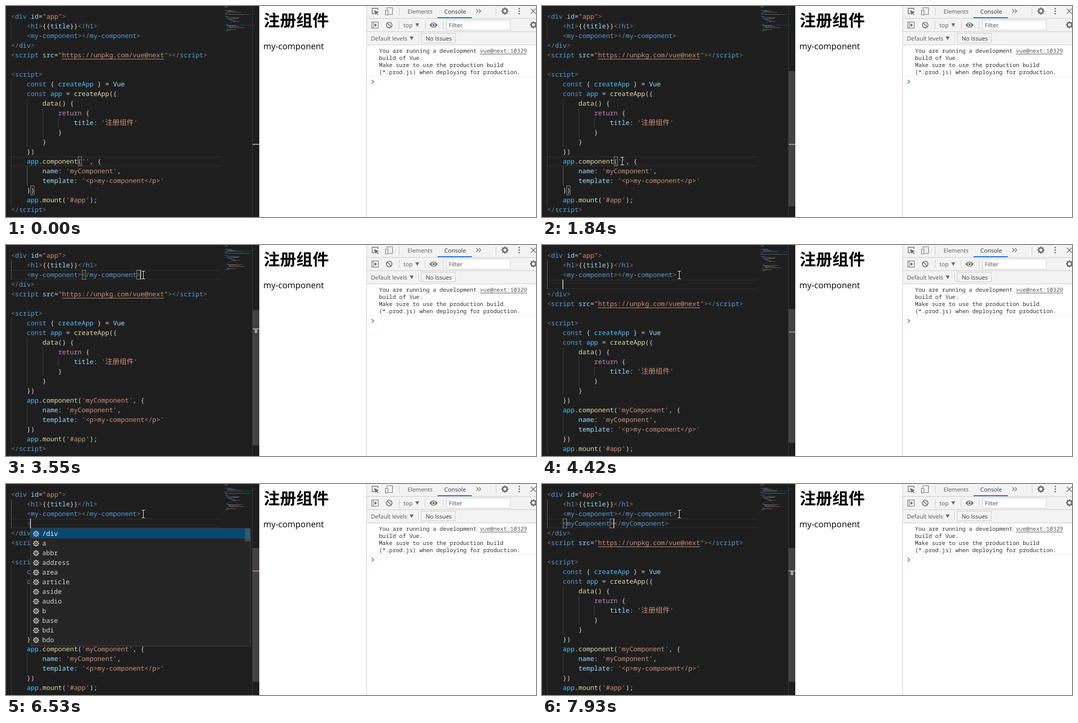
Animation, 1040 px wide and 415 px high, one loop 8 s. Source, as an HTML page with a canvas:

```html
<!DOCTYPE html>
<html lang="zh">
<head>
<meta charset="utf-8">
<title>Component registration</title>
<style>
html, body { margin: 0; width: 1040px; height: 415px; overflow: hidden; background: #fff; }
canvas { display: block; }
</style>
</head>
<body>
<canvas id="stage" width="1040" height="415"></canvas>
<script>
const ctx = document.getElementById('stage').getContext('2d');
const LOOP = 8000;
const X0 = 9.5, Y0 = 11, CW = 7.697, LH = 19;
const MONO = '"Noto Sans Mono", "DejaVu Sans Mono", monospace';
const SANS = '"Open Sans", "Noto Sans", sans-serif';
const CJK = '"Noto Sans CJK SC", "Noto Sans CJK", sans-serif';
const CODE_FONT = '500 12.83px ' + MONO;

// Token colours, keyed by the first letter of each token
const COLORS = {
  p: '#808080', t: '#569cd6', a: '#9cdcfe', s: '#ce9178', d: '#d4d4d4',
  c: '#4fc1ff', f: '#dcdcaa', r: '#c586c0', e: '#8c4545'
};
const parse = line => line ? line.split('~').map(s => [s[0], s.slice(1)]) : [];

const HEAD = [
  'p<~tdiv~a id~d=~s"app"~p>',
  'p    <~th1~p>~d{{~atitle~d}}~p</~th1~p>',
  'p    <~tmy-component~p></~tmy-component~p>'
].map(parse);
const BODY = [
  'p</~tdiv~p>',
  'p<~tscript~a src~d=~s"https://unpkg.com/vue@next"~p></~tscript~p>',
  '',
  'p<~tscript~p>',
  't    const~d { ~ccreateApp~d } = ~aVue',
  't    const~c app~d = ~fcreateApp~d({',
  'f        data~d() {',
  'r            return~d {',
  "a                title:~s '注册组件'",
  'd            }',
  'd        }',
  'd    })',
  "c    app~d.~fcomponent~d(~s''~d, {",
  "a        name:~s 'myComponent'~d,",
  "a        template:~s '<p>my-component</p>'",
  'd    })',
  "c    app~d.~fmount~d(~s'#app'~d);",
  'p</~tscript~p>'
].map(parse);
const NAMED = parse("c    app~d.~fcomponent~d(~s'myComponent'~d, {");
const NEW_LINE = [
  [7930, 'p    <~tmyComponent~p></~tmyComponent~p>'],
  [7850, 'p    <~tmyComponent~p>'],
  [6900, 'p    <~tmyComponent'],
  [5580, 'e    <'],
  [0, '']
];
const TAGS = ['/div', 'a', 'abbr', 'address', 'area', 'article', 'aside', 'audio', 'b', 'base', 'bdi', 'bdo'];
const CARET_ON = [
  [500, 1030], [1330, 1840], [1990, 2560], [3060, 3840], [4350, 4930],
  [5360, 6100], [6460, 7340], [7780, 8000]
];

function box(x, y, w, h, color) {
  ctx.fillStyle = color;
  ctx.fillRect(x, y, w, h);
}
function frame(x, y, w, h, color) {
  ctx.strokeStyle = color;
  ctx.lineWidth = 1;
  ctx.strokeRect(x + .5, y + .5, w - 1, h - 1);
}
function text(str, x, y, font, color) {
  ctx.font = font;
  ctx.fillStyle = color;
  ctx.fillText(str, x, y);
}
function poly(points, color, width, close) {
  ctx.beginPath();
  points.forEach(([x, y]) => ctx.lineTo(x, y));
  if (close) ctx.closePath();
  ctx.strokeStyle = ctx.fillStyle = color;
  ctx.lineWidth = width || 1;
  if (width) ctx.stroke(); else ctx.fill();
}
function ring(x, y, r, color, width) {
  ctx.beginPath();
  ctx.arc(x, y, r, 0, 7);
  ctx.strokeStyle = color;
  ctx.lineWidth = width;
  ctx.stroke();
}
function disc(x, y, r, color) {
  ctx.beginPath();
  ctx.arc(x, y, r, 0, 7);
  ctx.fillStyle = color;
  ctx.fill();
}
function gear(x, y, r, color, width) {
  ring(x, y, r * .6, color, width);
  for (let i = 0; i < 8; i++) {
    const a = i * Math.PI / 4, c = Math.cos(a), s = Math.sin(a);
    poly([[x + c * r * .65, y + s * r * .65], [x + c * r, y + s * r]], color, r * .36);
  }
}

const colX = col => X0 + col * CW;
const rowY = row => Y0 + row * LH;

// Monospace text, one cell at a time; wide glyphs take 14px
function codeText(str, x, y, color) {
  for (const ch of str) {
    const wide = ch.charCodeAt(0) > 255;
    if (ch !== ' ') text(ch, x, y, wide ? '14px ' + CJK : CODE_FONT, color);
    x += wide ? 14 : CW;
  }
  return x;
}
function miniLine(tokens, y) {
  let x = 429;
  ctx.globalAlpha = .5;
  for (const [key, str] of tokens)
    for (const ch of str) {
      if (ch !== ' ') box(x, y, 1, 1, COLORS[key]);
      x++;
    }
  ctx.globalAlpha = 1;
}
function bracket(col, row) {
  const x = Math.ceil(colX(col)), y = rowY(row);
  box(x, y, 8, LH, 'rgba(0,100,0,.1)');
  frame(x, y, 8, LH, '#888');
}

function getState(t) {
  const added = t >= 4420, clicked = t >= 3330, pasted = t >= 2060;
  const line = NEW_LINE.find(([from]) => t >= from)[1];
  const tail = BODY.slice();
  if (pasted) tail[12] = NAMED;
  let caret;
  if (!clicked) caret = [pasted ? 30 : 19, 15];
  else if (!added) caret = [33, 2];
  else caret = [t >= 7850 ? 17 : t >= 6900 ? 16 : t >= 5580 ? 5 : 4, 3];
  let pairs = [];
  if (!clicked) pairs = [[17, 15], [5, 18]];
  else if (!added) pairs = [[18, 2], [32, 2]];
  else if (t >= 7930) pairs = [[4, 3], [16, 3]];
  return { added, clicked, caret, pairs, rows: [...HEAD, ...(added ? [parse(line)] : []), ...tail] };
}

function mouseAt(t) {
  if (t < 130) return null;
  const clamp = v => Math.min(1, Math.max(0, v));
  if (t < 2420) {
    const k = 1 - (1 - clamp((t - 60) / 760)) ** 2;
    return [915 - 757.5 * k, 410 - 105 * k];
  }
  const u = clamp((t - 2420) / 770), k = u * u * (3 - 2 * u);
  return [157.5 + 112 * k, 305 - 246 * k];
}

function drawEditor(t, st, mouse) {
  const sh = st.added ? 1 : 0;
  const [col, row] = st.caret;
  box(0, 0, 497, 415, '#1e1e1e');
  box(10, rowY(row), 412, 2, '#282828');
  box(10, rowY(row) + 17, 412, 2, '#282828');

  const guides = [[0, 1, 2 + sh], [0, 7, 19], [4, 9, 13], [8, 10, 12], [12, 11, 11], [4, 16, 17]];
  guides.forEach(([c, from, to], i) => {
    const d = i ? sh : 0, active = i === (st.clicked ? 0 : 5);
    const end = i ? to + d : to;
    box(Math.floor(colX(c)) + 1, rowY(from + d), 1, (end - from - d + 1) * LH, active ? '#686860' : '#404040');
  });
  st.pairs.forEach(([c, r]) => bracket(c, r));

  st.rows.forEach((tokens, i) => {
    let x = X0 + .5;
    for (const [key, str] of tokens) x = codeText(str, x, rowY(i) + 14, COLORS[key]);
  });
  box(110, rowY(4 + sh) + 17, 200, 1, COLORS.s);

  if (CARET_ON.some(([a, b]) => t >= a && t < b))
    box(Math.floor(colX(col)), rowY(row), 2, LH, '#aeafad');

  // Minimap
  box(428, 8 + row * 2 - 1, 55, 2, '#10344c');
  miniLine(parse('p</~thead~p>'), 0);
  miniLine(parse('p<~tbody~p>'), 2);
  st.rows.forEach((tokens, i) => miniLine(tokens, 8 + i * 2));

  // Scroll track
  box(483, 0, 1, 415, '#3a3a3a');
  if (mouse && mouse[0] < 497) {
    if (sh) box(484, 126, 13, 263, '#424242');
    else box(484, 128, 13, 266, '#424242');
  }
  const y = sh ? 170 : st.clicked ? 164 : 271;
  box(484, y, 13, 2, sh && t < 7930 ? '#a98482' : '#a0a0a0');
  if (st.clicked && st.pairs.length) box(488, y, 5, 9, '#a0a0a0');
}

function drawPopup() {
  box(48, 87, 432, 232, '#252526');
  frame(48, 87, 432, 232, '#454545');
  box(49, 88, 430, LH, '#094771');
  TAGS.forEach((tag, i) => {
    const y = 88 + i * LH;
    gear(59, y + 10, 6, '#c5c5c5', 1.2);
    ring(59, y + 10, 1.2, '#c5c5c5', 1);
    codeText(tag, 71, y + 14, i ? '#d4d4d4' : '#fff');
  });
  box(469, 88, 10, 25, 'rgba(121,121,121,.4)');
}

function drawPage() {
  box(497, 0, 210, 415, '#fff');
  text('注册组件', 505.5, 40, 'bold 32px ' + CJK, '#000');
  text('my-component', 505, 85, '16.7px ' + SANS, '#000');
}

function drawTools() {
  const ink = '#6e6e6e', ui = '11.4px ' + SANS, edge = '#cbcbcb';
  const label = (s, x, y, color) => text(s, x, y, ui, color || '#5a5a5a');
  const down = (x, y) => poly([[x - 4, y - 3], [x + 4, y - 3], [x, y + 4]], ink);
  const split = (x, y) => box(x, y, 1, 16, '#ccc');
  box(707, 0, 333, 415, '#fff');
  box(707, 0, 333, 77, '#f3f3f3');
  box(707, 0, 1, 415, edge);
  [24, 50, 76].forEach(y => box(708, y, 332, 1, edge));

  // Tab row
  poly([[723, 15], [718.5, 15], [718.5, 4.5], [730, 4.5], [730, 8]], ink, 1.3);
  poly([[722, 8], [732, 12], [728, 13.5], [731, 17], [729.5, 18], [726.5, 14.5], [725, 18]], ink);
  frame(747, 3, 12, 14, ink);
  box(743, 7, 8, 11, '#f3f3f3');
  frame(744, 8, 6, 10, ink);
  split(771, 3);
  label('Elements', 788, 15);
  label('Console', 860, 15, '#333');
  box(847, 22, 67, 2, '#1a73e8');
  [923, 928].forEach(x => poly([[x, 6.5], [x + 3.5, 10], [x, 13.5]], ink, 1.4));
  split(961, 3);
  gear(979, 10, 7, ink, 2.6);
  [5, 10, 15].forEach(y => disc(1007, y, 1.5, ink));
  poly([[1030, 5.5], [1039.5, 15]], ink, 1.5);
  poly([[1039.5, 5.5], [1030, 15]], ink, 1.5);

  // Filter row
  frame(717, 31, 14, 13, ink);
  box(720, 31, 1, 13, ink);
  poly([[723, 34], [728, 37.5], [723, 41]], ink);
  ring(752, 37.5, 5.5, ink, 1.6);
  poly([[748, 33.5], [756, 41.5]], ink, 1.6);
  split(771, 30);
  label('top', 780, 42);
  down(807, 37);
  split(822, 30);
  ctx.beginPath();
  ctx.moveTo(831, 37.5);
  ctx.quadraticCurveTo(839, 27.5, 847, 37.5);
  ctx.quadraticCurveTo(839, 47.5, 831, 37.5);
  ctx.fillStyle = ink;
  ctx.fill();
  disc(839, 37.5, 3.7, '#f3f3f3');
  disc(839, 37.5, 2.2, ink);
  split(857, 30);
  box(864, 27, 126, 21, '#fff');
  frame(864, 27, 126, 21, edge);
  label('Filter', 869, 42, '#4a4a4a');
  gear(1035, 37, 7, ink, 2.6);

  // Level row
  label('Default levels', 716, 68);
  down(796, 63);
  split(809, 55);
  frame(814, 53, 68, 20, edge);
  label('No Issues', 823.5, 68, '#333');

  // Console message
  const mono = '11px ' + MONO;
  ['You are running a development', 'build of Vue.', 'Make sure to use the production build',
    '(*.prod.js) when deploying for production.'
  ].forEach((s, i) => text(s, 732, 92 + i * 14, mono, '#303030'));
  text('vue@next:10329', 930, 92, mono, '#545454');
  box(930, 94, 92, 1, '#545454');
  box(708, 138, 332, 1, '#efefef');
  poly([[717.5, 145.5], [721.5, 149], [717.5, 152.5]], '#367cf1', 1.6);
}

function drawMouse([x, y]) {
  if (x > 421) {
    const pts = [[0, 0], [0, 16], [4, 12.5], [6.5, 18], [9, 17], [6.5, 11.5], [11, 11.5]].map(([a, b]) => [x + a, y + b]);
    poly(pts, '#fff');
    poly(pts, '#000', 1, true);
    return;
  }
  x = Math.round(x - .5);
  y = Math.round(y) - 8;
  const beam = (g, color) => {
    box(x - g, y - g, 1 + 2 * g, 16 + 2 * g, color);
    [0, 15].forEach(dy => box(x - 3 - g, y + dy - g, 7 + 2 * g, 1 + 2 * g, color));
  };
  beam(1, '#111');
  beam(0, '#fff');
}

function draw(t) {
  const st = getState(t), mouse = mouseAt(t);
  drawPage();
  drawTools();
  drawEditor(t, st, mouse);
  if (t >= 5720 && t < 6900) drawPopup();
  if (mouse) drawMouse(mouse);
}

ctx.textRendering = 'geometricPrecision';
function tick() {
  draw(performance.now() % LOOP);
  requestAnimationFrame(tick);
}
tick();
</script>
</body>
</html>
```
